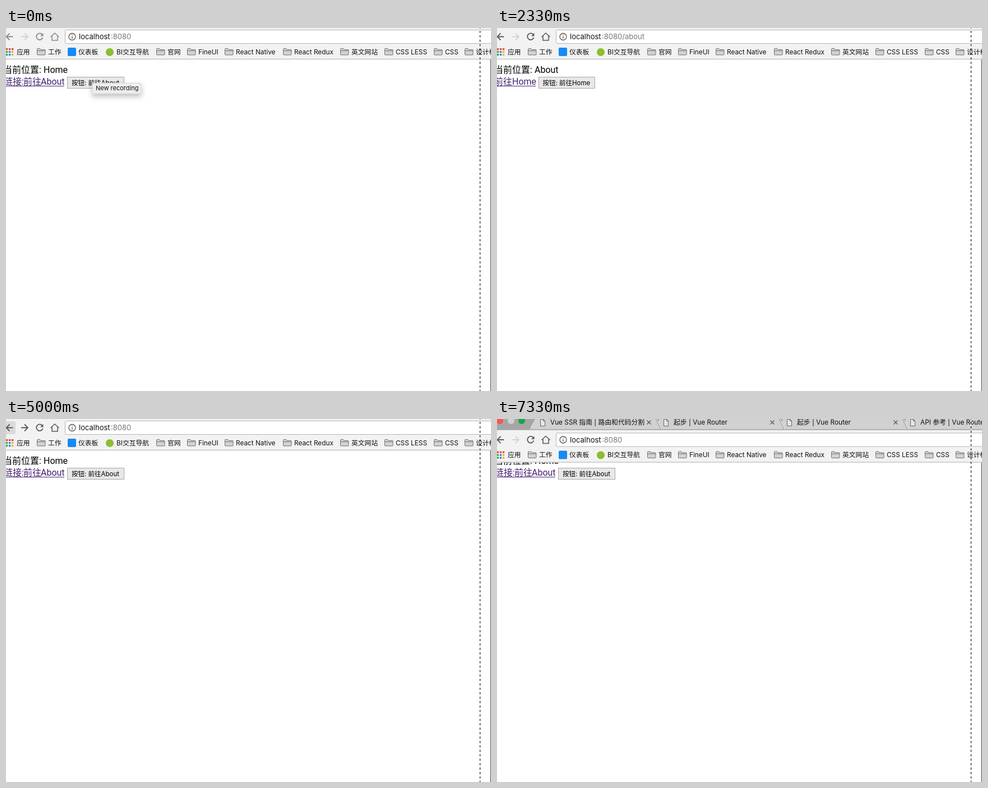
Animation, 865 px wide and 647 px high, one loop 7.39 s. Source, as an HTML page:

```html
<!DOCTYPE html>
<html lang="zh-CN">
<head>
<meta charset="utf-8">
<title>Router demo</title>
<style>
  html, body { margin: 0; width: 100%; height: 100%; overflow: hidden; background: #fff; }
  svg { display: block; width: 865px; height: 647px; }
  text { font-family: Inter, "Noto Sans CJK SC", "Noto Sans CJK", sans-serif; fill: #111; white-space: pre; }
  .page text { font: 16px Roboto, "Noto Sans CJK SC", "Noto Sans CJK", sans-serif; fill: #000; }
  .page .link { fill: #43206f; }
  .page .label { font: 11.5px Inter, "Noto Sans CJK SC", "Noto Sans CJK", sans-serif; }
  .button { fill: #e8e8e8; stroke: #a8a8a8; }
  .mark, .tab { font-size: 11.8px; }
  .url { font-size: 13px; }
  .port { fill: #777; }
  .icon { fill: none; stroke: currentColor; stroke-width: 1.8; }
  .tip { font-size: 11px; }
</style>
</head>
<body>
<svg viewBox="0 0 865 647">
  <defs>
    <filter id="soft" x="-20%" y="-60%" width="140%" height="260%">
      <feDropShadow dx="0" dy="5" stdDeviation="5" flood-color="#000" flood-opacity=".25"/>
    </filter>
    <g id="folder" stroke="#727272" fill="#d2d2d2">
      <path d="M.5 11V1.5q0-1 1-1h4l1.5 2h7q1 0 1 1V11q0 1-1 1h-12.5q-1 0-1-1z"/>
      <path d="M.5 4.5h14.5" fill="none"/>
    </g>
    <path id="doc" d="M.5.5h5l3 3v9h-8zM5.5.5v3h3" fill="#e6e6e6" stroke="#666"/>
    <path id="close" d="M-3.5-3.5l7 7m0-7l-7 7" stroke="#555" stroke-width="1.3"/>
    <g id="edge" fill="none">
      <path d="M2-24h8l-4 8z" fill="#a6a6a6"/>
      <path d="M2-22l9 19" stroke="#929292"/>
      <path d="M3.5-22l9 19" stroke="#e6e6e6"/>
    </g>
  </defs>

  <g id="home" class="page">
    <text x="-5" y="80">当前位置: </text><text x="67" y="80">Home</text>
    <text class="link" x="-4" y="101">链接:</text><text class="link" x="31" y="101">前往</text>
    <text class="link" x="62" y="101">About</text>
    <path d="M0 103.5H104" stroke="#43206f"/>
    <rect class="button" x="109.5" y="87.5" width="101" height="20"/>
    <text class="label" x="117" y="101.5">按钮: 前往About</text>
  </g>
  <g id="about" class="page">
    <text x="-5" y="80">当前位置: </text><text x="67" y="80">About</text>
    <text class="link" x="-5" y="101">前往</text><text class="link" x="27" y="101">Home</text>
    <path d="M0 103.5H69" stroke="#43206f"/>
    <rect class="button" x="74.5" y="87.5" width="100" height="20"/>
    <text class="label" x="81.5" y="101.5">按钮: 前往Home</text>
  </g>

  <g id="chrome">
    <rect y="-40" width="865" height="39" fill="#a6a6a6"/>
    <path d="M57-3L67-22V-40H865V-3z" fill="#d1d1d1"/>
    <path d="M57-3L67-22" stroke="#888"/>
    <circle cx="5" cy="-18.5" r="6" fill="#fc5552"/>
    <circle cx="25" cy="-18.5" r="6" fill="#d0d0d0"/>
    <circle cx="44" cy="-18.5" r="6" fill="#12a84b"/>
    <g id="tabs"></g>
    <rect y="-2" width="865" height="58" fill="#f2f2f2"/>
    <path d="M0-2.5H865" stroke="#a2a2a2"/>
    <path d="M0 55.5H865" stroke="#b2b2b2"/>
    <path d="M864.5 56V647" stroke="#444"/>
    <rect x="105.5" y="3.5" width="780" height="24" rx="2" fill="#fff" stroke="#b5b5b5"/>
    <rect id="hover" x="-3" y="4" width="20" height="23" rx="2" fill="#dadada"/>
    <g id="tools" class="icon">
      <path d="M12.5 15.5H1M6.5 9.5L.5 15.5l6 6"/>
      <path d="M64.5 11.5A5.8 5.8 0 1 0 65.6 17"/>
      <path d="M66.5 9v5.5H61z" fill="currentColor" stroke="none"/>
      <path d="M79.5 16L87 9l7.5 7M82 14.5V22h10v-7.5" stroke-width="1.6"/>
    </g>
    <path id="forward" class="icon" d="M27 15.5H38.5M33 9.5l6 6-6 6"/>
    <g fill="none" stroke="#555" stroke-width="1.3">
      <circle cx="118" cy="15.5" r="6"/><path d="M118 14.5V19M118 11.7V13"/>
    </g>
    <text class="url" x="130" y="20">localhost</text>
    <text class="url port" x="187" y="20">:8080<tspan id="path"></tspan></text>
    <g id="apps"></g>
    <rect x="110" y="35" width="15" height="15" rx="2" fill="#168af5"/>
    <circle cx="185" cy="43" r="7" fill="#8abf2f"/>
    <g id="marks"></g>
  </g>

  <g id="tip">
    <rect x="154" y="98" width="87" height="19" fill="#eee" stroke="#c9c9c9" stroke-width=".7" filter="url(#soft)"/>
    <text class="tip" x="160" y="111">New recording</text>
  </g>
  <path d="M845.5 0V647" stroke="#fff"/>
  <path d="M845.5 -3V647" stroke="#111" stroke-width="1.2" stroke-dasharray="3.95"/>
</svg>
<script>
  const LOOP = 7390;
  const el = id => document.getElementById(id);
  const use = (id, x, y) => `<use href="#${id}" x="${x}" y="${y}"/>`;
  const label = (cls, x, y, s) => `<text class="${cls}" x="${x}" y="${y}">${s}</text>`;

  // Bookmarks: [text x, label, has folder]
  const marks = [
    [19, '应用'], [75, '工作', 1], [129, '仪表板'], [197, 'BI交互导航'],
    [288, '官网', 1], [343, 'FineUI', 1], [410, 'React Native', 1],
    [514, 'React Redux', 1], [616, '英文网站', 1], [695, 'CSS LESS', 1],
    [783, 'CSS', 1], [838, '设计模式', 1]
  ];
  el('marks').innerHTML = marks.map(([x, s, folder]) =>
    (folder ? use('folder', x - 20, 36) : '') + label('mark', x, 46.5, s)).join('');

  const dots = ['#e24a3b', '#e24a3b', '#e24a3b', '#35a853', '#3b82e8', '#f2b32c', '#35a853', '#3b82e8', '#f2b32c'];
  el('apps').innerHTML = dots.map((c, i) =>
    `<rect x="${i % 3 * 5}" y="${36 + (i / 3 | 0) * 5}" width="3.3" height="3.3" fill="${c}"/>`).join('');

  const titles = ['Vue SSR 指南 | 路由和代码分割', '起步 | Vue Router', '起步 | Vue Router', 'API 参考 | Vue Router'];
  el('tabs').innerHTML = titles.map((s, i) => {
    const x = i * 220;
    return use('doc', 77 + x, -21.5) + label('tab', 95 + x, -11.5, s) +
      use('close', 271 + x, -15.5) + use('edge', 281 + x, 0);
  }).join('');

  // [start ms, page, back hovered, forward enabled]
  const states = [
    [0, 'home', 0, 0], [1070, 'about', 0, 0], [1470, 'home', 0, 0],
    [2070, 'about', 0, 0], [2800, 'home', 0, 0], [3470, 'home', 1, 0],
    [3800, 'about', 1, 1], [4600, 'home', 1, 1], [5400, 'about', 1, 1],
    [6000, 'about', 0, 1], [6400, 'home', 0, 0]
  ];
  // Toolbar slide: [start ms, offset]
  const slide = [[0, 0], [7270, 8], [7330, 21.5]];
  const at = (table, t) => table.findLast(row => row[0] <= t);

  function draw() {
    const t = performance.now() % LOOP;
    const [, page, hover, forward] = at(states, t);
    for (const id of ['home', 'about']) el(id).style.display = id === page ? '' : 'none';
    el('path').textContent = page === 'about' ? '/about' : '';
    el('hover').style.display = hover ? '' : 'none';
    el('tools').style.color = t < 400 ? '#8a8a8a' : '#5a5a5a';
    el('forward').style.color = forward ? '#5a5a5a' : '#d3d3d3';
    el('tip').style.opacity = Math.max(0, Math.min(1, (400 - t) / 260));
    el('chrome').setAttribute('transform', `translate(0 ${at(slide, t)[1]})`);
    requestAnimationFrame(draw);
  }
  draw();
</script>
</body>
</html>
```
